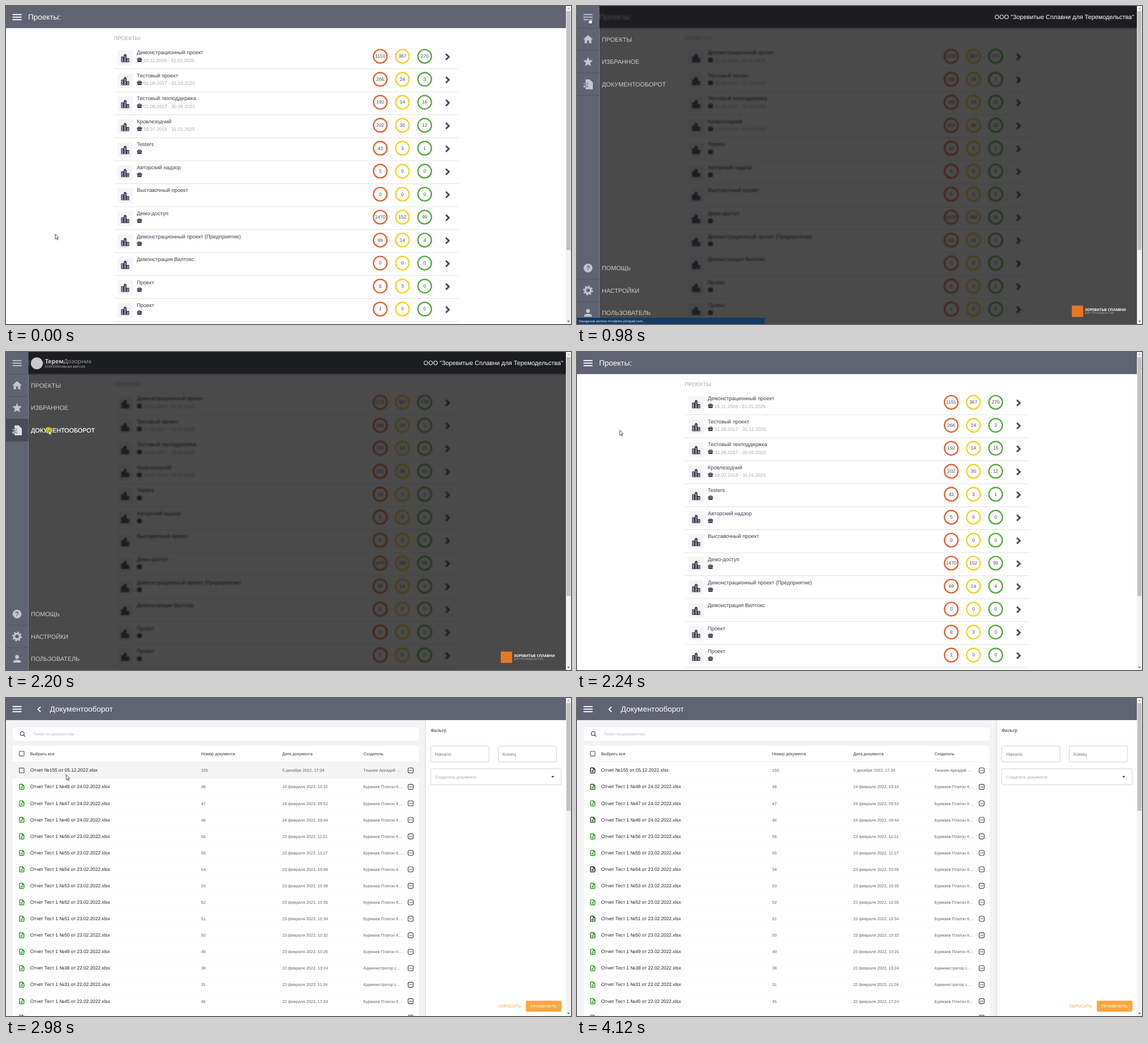
Recreate the animation shown at these times as an HTML page. Size 998 by 561 pixels, loop 4.96 s.

```html
<!DOCTYPE html>
<html lang="ru">
<head>
<meta charset="utf-8">
<title>Документооборот</title>
<style>
  html, body { margin: 0; width: 100%; height: 100%; overflow: hidden; background: #fefefe; }
  svg { display: block; width: 998px; height: 561px; }
  text { font-family: "Liberation Sans", Arial, sans-serif; text-rendering: geometricPrecision; white-space: pre; }
  .alt { font-family: "Open Sans", "Noto Sans", sans-serif; }
</style>
</head>
<body>
<svg id="stage" viewBox="0 0 998 561" xmlns="http://www.w3.org/2000/svg"></svg>
<script>
const LOOP = 4960;
const SLATE = '#606372', INK = '#3d4052', PAGE = '#f2f3f5', GREEN = '#1c9c10';

const rect = (x, y, w, h, fill, extra = '') =>
  `<rect x="${x}" y="${y}" width="${w}" height="${h}" fill="${fill}" ${extra}/>`;
const text = (x, y, size, fill, str, extra = '') =>
  `<text x="${x}" y="${y}" font-size="${size}" fill="${fill}" ${extra}>${str}</text>`;
const path = (d, fill, extra = '') => `<path d="${d}" fill="${fill}" ${extra}/>`;
const line = (d, color, width, extra = '') =>
  path(d, 'none', `stroke="${color}" stroke-width="${width}" ${extra}`);
const circle = (x, y, r, fill, extra = '') => `<circle cx="${x}" cy="${y}" r="${r}" fill="${fill}" ${extra}/>`;
const group = (id, body) => `<g id="${id}">${body}</g>`;
const at = (x, y, body, scale = 1) => `<g transform="translate(${x} ${y}) scale(${scale})">${body}</g>`;
const burger = color => [14.2, 18.7, 23.2].map(y => rect(11.5, y, 16, 1.9, color)).join('');
const header = rect(-10, -10, 1018, 49, SLATE);

// Project list
const PROJECTS = [
  ['Демонстрационный проект', '15.11.2009 - 31.01.2025', 1151, 367, 270],
  ['Тестовый проект', '01.08.2017 - 31.12.2020', 266, 24, 3],
  ['Тестовый техподдержка', '01.08.2017 - 30.06.2020', 192, 14, 16],
  ['Кровлезодчий', '18.07.2018 - 31.01.2025', 202, 30, 12],
  ['Testers', '', 43, 3, 1],
  ['Авторский надзор', '', 5, 0, 0],
  ['Выставочный проект', null, 0, 0, 0],
  ['Демо-доступ', '', 1470, 152, 99],
  ['Демонстрационный проект (Предприятие)', '', 69, 14, 4],
  ['Демонстрация Вилтокс', null, 0, 0, 0],
  ['Проект', '', 8, 3, 0],
  ['Проект', '', 1, 0, 0],
];
const WINDOWS = [[1.4, 6.8], [1.4, 9.6], [1.4, 12.3], [6.3, 4], [6.3, 6.8], [6.3, 9.6], [6.3, 12.3], [11.2, 9.6], [11.2, 12.3]]
  .map(([x, y]) => `M${x} ${y}h1.7v1.6h-1.7z`).join('');
const building = path('M0 5H4.6V2.4L7.2 0L9.8 2.4V7.8H14.4V15H0Z' + WINDOWS, INK, 'fill-rule="evenodd"');
const briefcase = path('M0 2.6q0-1 1-1h7q1 0 1 1v1.9h-9zM.6 5h7.8v2q0 1-1 1h-5.8q-1 0-1-1z', INK)
  + line('M2.6 2V.5H6.4V2', INK, 0.9);

const badge = (x, color, n) =>
  circle(x, 88.8, 11.9, '#fefefe', `stroke="${color}" stroke-width="2.4"`)
  + text(x, 91.4, 8.32, '#484b5b', n, 'text-anchor="middle"');

const projectRow = ([name, dates, red, yellow, green], i) => at(0, i * 40.53,
  rect(197, 78, 27, 26, '#f5f5f7', 'rx="2"') + at(203.2, 84.2, building)
  + text(231, 85.3, 9.36, INK, name)
  + (dates === null ? '' : at(231.3, 91, briefcase) + text(243, 98.8, 8.32, '#a9abb3', dates))
  + badge(661, '#e2612f', red) + badge(700.2, '#f2d21c', yellow) + badge(739.5, '#50a83c', green)
  + line('M777 84.6L782.3 89.8L777 95', '#505050', 3)
  + rect(191, 110.4, 608, 0.9, '#e1e1e4'));

const projects = group('projects', rect(-10, -10, 1018, 581, '#fefefe') + header + burger('#fff')
  + text(39, 24.2, 13.52, '#fff', 'Проекты:')
  + text(190.5, 60.3, 9.36, '#a3a5ae', 'ПРОЕКТЫ:')
  + PROJECTS.map(projectRow).join(''));

// Side menu
const icon24 = (d, y) => color => at(9.3, y - 10.2, path(d, color), 0.85);
const MENU = [
  ['ПРОЕКТЫ', 59, icon24('M10 20v-6h4v6h5v-8h3L12 3 2 12h3v8z', 59)],
  ['ИЗБРАННОЕ', 98.5, icon24('M12 17.3L18.2 21l-1.7-7L22 9.2l-7.2-.6L12 2 9.2 8.6 2 9.2l5.5 4.8L5.8 21z', 98.5)],
  ['ДОКУМЕНТООБОРОТ', 138.2, color => path('M15 129.5h7.5l5.5 5.5v10.500q0 1.500-1.500 1.500h-10q-1.500 0-1.500-1.500z', color)
    + line('M11 137h7m-2-2l2.200 2-2.200 2M20 142h-8m2-2l-2.200 2 2.200 2', SLATE, 2.6)
    + line('M11 137h7m-2-2l2.200 2-2.200 2M20 142h-8m2-2l-2.200 2 2.200 2', color, 1.1)],
  ['ПОМОЩЬ', 462.3, color => circle(19.5, 462.3, 7.8, color)
    + text(19.5, 466.4, 11.5, SLATE, '?', 'text-anchor="middle" font-weight="bold"')],
  ['НАСТРОЙКИ', 501.8, color => circle(19.5, 501.8, 4.9, 'none', `stroke="${color}" stroke-width="3.4"`)
    + circle(19.5, 501.8, 7.4, 'none', `stroke="${color}" stroke-width="2.4" stroke-dasharray="3.1 2.712"`)],
  ['ПОЛЬЗОВАТЕЛЬ', 541.3, icon24('M12 12a4 4 0 1 0 0-8 4 4 0 0 0 0 8zm0 2c-2.700 0-8 1.300-8 4v2h16v-2c0-2.700-5.300-4-8-4z', 541.3)],
];
const menuItem = ([label, y, icon], color, iconColor) => icon(iconColor) + text(44, y + 3.8, 10.8, color, label);
const hoverItem = i => group('hover' + i,
  rect(0, MENU[i][1] - 20, 39.5, 39, '#484b59') + menuItem(MENU[i], '#fff', '#dcdde2'));

const menu = group('menu', rect(39.5, 0, 949.5, 561, '#000', 'opacity=".71"')
  + rect(0, 0, 39.5, 561, SLATE)
  + [39, 78.5, 118, 157.5, 481.8, 521.3].map(y => rect(0, y - 0.4, 39.5, 0.9, '#50535f')).join('')
  + burger('#c3c5cd')
  + MENU.map(item => menuItem(item, '#cbcbcb', '#c3c5cd')).join('')
  + [0, 1, 2].map(hoverItem).join('')
  + text(984, 23.4, 10.86, '#fff', 'ООО "Зоревитые Сплавни для Теремодельства"', 'text-anchor="end"')
  + rect(874, 528.5, 20, 20, '#e87722')
  + text(897, 537.5, 6.3, '#fff', 'ЗОРЕВИТЫЕ СПЛАВНИ', 'class="alt" font-weight="bold"')
  + text(897, 543.4, 4.6, '#b5b5b5', 'ДЛЯ ТЕРЕМОДЕЛЬСТВА', 'class="alt"')
  + group('brand', circle(54.5, 20, 10.6, '#c9c9cb')
    + text(69, 20.4, 10.4, '#a5a5a7', '<tspan font-weight="bold" fill="#d0d0d2">Терем</tspan>Дозорник', 'class="alt"')
    + text(69, 27.6, 5.6, '#c4c4c6', 'КОРПОРАТИВНАЯ ВЕРСИЯ', 'class="alt"'))
  + group('status', rect(0, 550, 331.5, 11, '#123a66')
    + text(2.5, 557.8, 5.8, '#fff', 'Ожидание service-mrsdemo.plotpad.com...', 'class="alt"')));

// Documents
const DOCS = [
  [155, '17:34'], [48, '10:10', 24], [47, '09:52', 24], [46, '09:44', 24],
  [56, '11:21', 23], [55, '11:17', 23], [54, '10:49', 23], [53, '10:38', 23], [52, '10:35', 23],
  [51, '10:34', 23], [50, '10:32', 23], [49, '10:26', 23],
  [38, '13:24', 22], [31, '11:24', 22], [45, '17:24', 22], [44, '17:20', 22],
];
const VISITED = { 0: '#1f2d1a', 1: '#1d5c14', 3: '#17420f', 6: '#1a1a14', 9: '#174a0f', 10: '#1f6b15' };
const ROW = 29.08;

const checkbox = y => rect(23.5, y - 4.2, 8.4, 8.4, 'none', 'rx=".8" stroke="#555" stroke-width="1.1"');
const sheet = (id, color) => group(id,
  line('M29 123.200h-3.800q-1.500 0-1.500 1.500v6.200q0 1.500 1.500 1.500h5q1.500 0 1.500-1.500v-5zv2.700h2.700', color, 1.35)
  + circle(27.7, 129, 1.6, 'none', `stroke="${color}" stroke-width=".9"`) + line('M26.200 129h3', color, 0.7));
const dots = rect(710.2, 123.3, 9.2, 9, 'none', 'rx="2.6" stroke="#444" stroke-width="1.1"')
  + [712.6, 714.8, 717].map(x => circle(x, 127.8, 0.8, '#444')).join('');

const creator = n => n === 155 ? 'Тишнев Аркадий …' : n === 38 || n === 31 ? 'Администратор с…' : 'Бурмаев Платон К…';
const docRow = ([n, time, day], i) => {
  const name = day ? `Отчет Тест 1 №${n} от ${day}.02.2022.xlsx` : `Отчет №${n} от 05.12.2022.xlsx`;
  const date = day ? `${day} февраля 2022, ${time}` : `5 декабря 2022, ${time}`;
  const cell = (x, str) => text(x, 130.4, 7.28, '#666', str);
  const hover = i in VISITED
    ? group('row' + i, rect(12, 113, 717, 29, '#f4f4f4') + checkbox(127.8)) + sheet('seen' + i, VISITED[i]) : '';
  return at(0, i * ROW, hover + sheet('sheet' + i, GREEN) + text(42.8, 130.4, 8.32, '#222', name)
    + cell(344.7, n) + cell(488, date) + cell(631.3, creator(n)) + dots
    + rect(12, 142, 717, 0.5, '#f8f8f8'));
};

const field = (x, y, w, label, size, color) =>
  rect(x, y, w, 28, '#fff', 'rx="2" stroke="#c6c6c6" stroke-width=".8"') + text(x + 7.5, y + 17, size, color, label);
const heading = (x, str) => text(x, 100.5, 7.28, '#333', str);

const panel = group('panel', rect(729, 39, 30, 522, PAGE)
  + rect(740.2, 39, 1.6, 522, '#d9dadd') + rect(741.5, 39, 257, 522, '#fefefe')
  + text(750, 60.3, 8.32, '#333', 'Фильтр')
  + field(750.4, 84.8, 102.600, 'Начало', 8.32, '#777') + field(869.6, 84.8, 102.600, 'Конец', 8.32, '#777')
  + field(750.4, 125, 230.3, 'Создатель документа', 7.28, '#aaa')
  + path('M963 137.800h5.600l-2.800 2.800z', '#333')
  + text(869.6, 546, 7.28, '#fba63c', 'СБРОСИТЬ')
  + rect(918.3, 534.8, 62.8, 19, '#c9c9c9', 'rx="2.500"') + rect(918.3, 534, 62.8, 19, '#ffa63e', 'rx="2"')
  + text(949.7, 546, 7.28, '#fff', 'ПРИМЕНИТЬ', 'text-anchor="middle"'));

const docs = group('docs', rect(0, 0, 998, 561, PAGE)
  + rect(12, 52, 726, 23.3, '#fefefe', 'rx="2"') + rect(12, 84, 726, 480, '#fefefe', 'rx="2"')
  + circle(28.6, 62.7, 3.4, 'none', 'stroke="#333" stroke-width="1.1"') + line('M31 65.200l2.700 2.700', '#333', 1.2)
  + text(47.8, 65.5, 7.28, '#bcbcbc', 'Поиск по документам')
  + checkbox(98.2) + heading(42.8, 'Выбрать все') + heading(344.7, 'Номер документа')
  + heading(488, 'Дата документа') + heading(631.3, 'Создатель')
  + rect(12, 112.2, 717, 0.8, '#eee')
  + group('rows', DOCS.map(docRow).join(''))
  + panel
  + header + burger('#fff') + line('M61 15.500L56.500 20L61 24.500', '#fff', 1.8)
  + text(77.6, 24.2, 13.52, '#fff', 'Документооборот'));

const scrollbar = group('scrollbar', rect(989, 0, 9, 561, '#f1f1f1')
  + path('M991.400 5.500h4.400l-2.200-2.600z', '#a3a3a3') + path('M991.400 555.200h4.400l-2.200 2.600z', '#505050')
  + rect(990, 9, 7, 190, '#c1c1c1') + group('thumb', rect(990, 9, 7, 421.5, '#c1c1c1')));

const arrow = path('M0 0V8.800L2 7L3.500 10.200L4.900 9.600L3.400 6.400H6Z', '#fff',
  'stroke="#222" stroke-width=".8" stroke-linejoin="round"');
const hand = path('M-.8 .7Q-.8-.2 0-.2T.8 .7V4Q2 3.300 2.600 4.200Q3.700 3.700 4.100 4.600Q5.300 4.300 5.300 5.500V8L4.300 10.600H-.2L-2.500 7.200Q-2.800 5.700-.8 6.400Z',
  '#fff', 'stroke="#222" stroke-width=".8" stroke-linejoin="round"');
const pointer = group('pointer', group('arrow', arrow) + group('hand', hand));

document.getElementById('stage').innerHTML =
  projects + menu + docs + scrollbar + group('click', circle(75, 138, 6, '#d8d000', 'opacity=".75"')) + pointer;

// Timing: every track is a list of [ms, value], held until the next entry
const track = (id, prop, points) => {
  const last = points[points.length - 1][1];
  const frames = [...points, [LOOP, last]].map(([ms, value]) =>
    ({ offset: ms / LOOP, [prop]: value, easing: 'step-end' }));
  document.getElementById(id).animate(frames, { duration: LOOP, iterations: Infinity });
};
const show = (id, from, to = LOOP) => track(id, 'opacity',
  [...(from > 0 ? [[0, 0]] : []), [from, 1], ...(to < LOOP ? [[to, 0]] : [])]);

const ease = p => (1 - Math.cos(Math.PI * p)) / 2;
const move = (start, end, count, [x0, y0], [x1, y1]) => Array.from({ length: count }, (_, i) => {
  const p = ease((i + 1) / count);
  return [start + (end - start) * i / (count - 1), [x0 + (x1 - x0) * p, y0 + (y1 - y0) * p]];
});

const HOME = [87, 402.5], CORNER = [17, 42], BURGER = [21.8, 20.8], ITEM = [75.5, 138], FIRST = [106.5, 135.5];
const SWEEP = [[3810, 139, 0], [3849, 160, 1], [3888, 217, 3], [3926, 304, 6], [3965, 388, 9], [4004, 412, 10], [4042, 419, 10], [4081, 421, 10]];
const route = [
  [0, HOME],
  ...move(50, 570, 17, HOME, CORNER),
  ...move(600, 760, 5, CORNER, BURGER),
  ...move(1140, 1650, 16, BURGER, ITEM),
  ...move(2350, 2550, 6, ITEM, FIRST),
  ...SWEEP.map(([ms, y], i) => [ms, [107 + i, y]]),
];
track('pointer', 'transform', route.map(([ms, [x, y]]) => [ms, `translate(${x}px, ${y}px)`]));
show('pointer', 0, 4120);
show('hand', 600, 1260);
track('arrow', 'opacity', [[0, 1], [600, 0], [1260, 1]]);

track('projects', 'filter', [[0, 'none'], [980, 'blur(1px)'], [2240, 'none']]);
show('menu', 980, 2240);
show('brand', 1020);
show('status', 980, 1300);
show('hover0', 1260, 1385);
show('hover1', 1385, 1507);
show('hover2', 1507);
show('click', 2100, 2240);

show('docs', 2350);
show('rows', 2980);
track('panel', 'transform', [[0, 'translate(9px, 0px)'], [2980, 'translate(0px, 0px)']]);
track('scrollbar', 'opacity', [[0, 1], [2350, 0], [2980, 1]]);
show('thumb', 0, 2350);

for (const key in VISITED) {
  const row = Number(key);
  const enter = row ? SWEEP.find(s => s[2] === row)[0] : 0;
  const next = SWEEP.find(s => s[2] > row);
  const leave = next ? next[0] : 4120;
  show('row' + row, enter, leave);
  show('sheet' + row, 0, enter || 1);
  show('seen' + row, leave);
}
</script>
</body>
</html>
```
